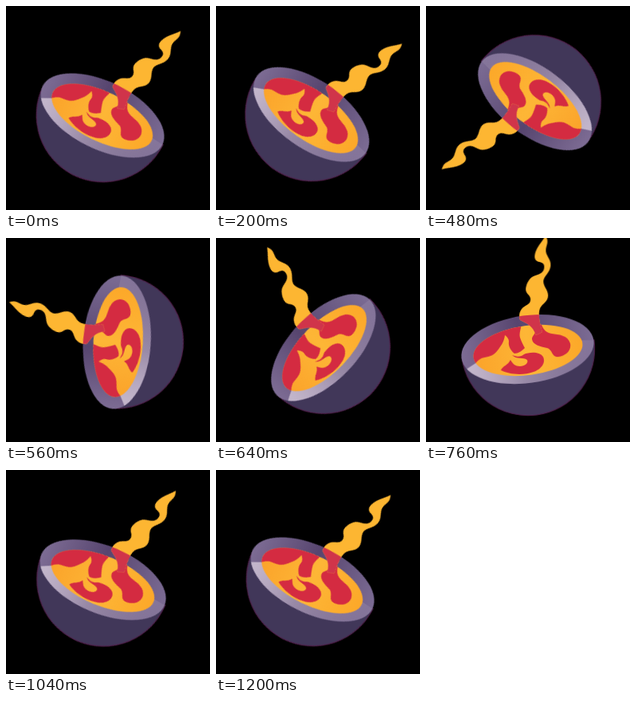
An HTML page for the animation above (1.24 s loop, 256 by 256 pixels).

```html
<!DOCTYPE html>
<html lang="en">
<head>
<meta charset="utf-8">
<title>Spinning bowl</title>
<style>
  html, body { margin: 0; width: 100%; height: 100%; overflow: hidden; background: #000; }
  svg { display: block; width: 100vw; height: 100vh; }

  #spin {
    transform-origin: 128px 128px;
    animation: spin 1240ms infinite;
  }

  /* Slow wind-up, fast sweep, long settle; speeds agree where segments meet. */
  @keyframes spin {
    0%       { transform: rotate(34deg);    animation-timing-function: cubic-bezier(.5, 0, .85, .274); }
    25.806%  { transform: rotate(75deg);    animation-timing-function: cubic-bezier(.333, .221, .667, .697); }
    38.71%   { transform: rotate(224.4deg); animation-timing-function: cubic-bezier(.333, .401, .667, .717); }
    45.161%  { transform: rotate(281deg);   animation-timing-function: cubic-bezier(.333, .503, .667, .803); }
    61.29%   { transform: rotate(360deg);   animation-timing-function: cubic-bezier(.333, .555, .667, .799); }
    74.194%  { transform: rotate(382.6deg); animation-timing-function: cubic-bezier(.333, .696, .667, 1); }
    96.774%, 100% { transform: rotate(394deg); }
  }
</style>
</head>
<body>
<svg viewBox="0 0 256 256">
  <defs>
    <linearGradient id="rimFill" gradientUnits="userSpaceOnUse" x1="44" y1="0" x2="212" y2="0">
      <stop offset="0" stop-color="#7d6c94"/>
      <stop offset=".45" stop-color="#57456f"/>
      <stop offset="1" stop-color="#7c6c94"/>
    </linearGradient>
    <linearGradient id="shine" gradientUnits="userSpaceOnUse" x1="58" y1="0" x2="205" y2="0">
      <stop offset="0" stop-color="#c2b5ca"/>
      <stop offset="1" stop-color="#c2b5ca" stop-opacity=".15"/>
    </linearGradient>
    <linearGradient id="soupFill" x1="0" y1="0" x2="1" y2="0">
      <stop offset="0" stop-color="#fba32a"/>
      <stop offset=".5" stop-color="#fdb636"/>
      <stop offset="1" stop-color="#fca829"/>
    </linearGradient>
    <ellipse id="rim" cx="127.5" cy="139.6" rx="83.7" ry="42.4" transform="rotate(-8 127.5 139.6)"/>
    <ellipse id="soup" cx="128" cy="141" rx="69" ry="31" transform="rotate(-8 128 141)"/>
    <clipPath id="rimClip"><use href="#rim"/></clipPath>
    <clipPath id="soupClip"><use href="#soup"/></clipPath>
    <path id="flame" d="M149.5 -3C147 2 142 7 139 13C136 19 134 26 139 29C143 31 148 30 148 36
      C148 43 143 45 137 47C130 49 126 56 125 63C124 70 131 71 131 77C131 84 124 84 120 89
      C117 93 116 98 118 103C126 107 134 110 138 122L146 118C143 108 140 95 143 88
      C146 82 153 80 153 72C153 65 147 61 147 54C148 47 155 44 156 35
      C157 26 149 22 150 14C151 8 154 4 149.5 -3Z"/>
  </defs>

  <g id="spin">
    <path d="M44.3 139A83.7 83.7 0 0 0 211.7 139Z" transform="rotate(-8 128 139)"
          fill="#413759" stroke="#531f4c"/>
    <use href="#rim" fill="url(#rimFill)"/>
    <path d="M72 151L40 172V230H216V128H190Z" fill="url(#shine)" clip-path="url(#rimClip)"/>
    <use href="#soup" fill="url(#soupFill)"/>

    <g clip-path="url(#soupClip)" fill="#d42b41">
      <path d="M50 160L56 100L120 100C121 112 116 118 118 125C120 131 122 134 124 138
        C120 142 116 145 111 145C106 141 103 135 104 130C104 127 102 124 99 122
        C98 131 93 137 90 141C86 147 80 149 74 150C68 151 65 154 62 158Z"/>
      <path d="M118 102L143 102C145 113 150 119 158 120C167 121 178 122 181 132
        C183 141 175 148 166 149C157 149 160 141 152 138C143 136 134 134 133 127
        C133 122 138 121 137 115C133 109 126 106 118 104Z"/>
      <path d="M108 147C116 150 119 149 123 146C129 143 143 142 147 149C151 157 144 165 135 168
        C122 173 103 171 94 166C97 160 103 160 106 153C109 158 112 161 118 161
        C124 161 129 157 127 153C122 149 114 153 108 147Z"/>
    </g>

    <use href="#flame" fill="#fdb632"/>
    <g clip-path="url(#rimClip)">
      <use href="#flame" fill="#d0344a"/>
    </g>
  </g>
</svg>
</body>
</html>
```
